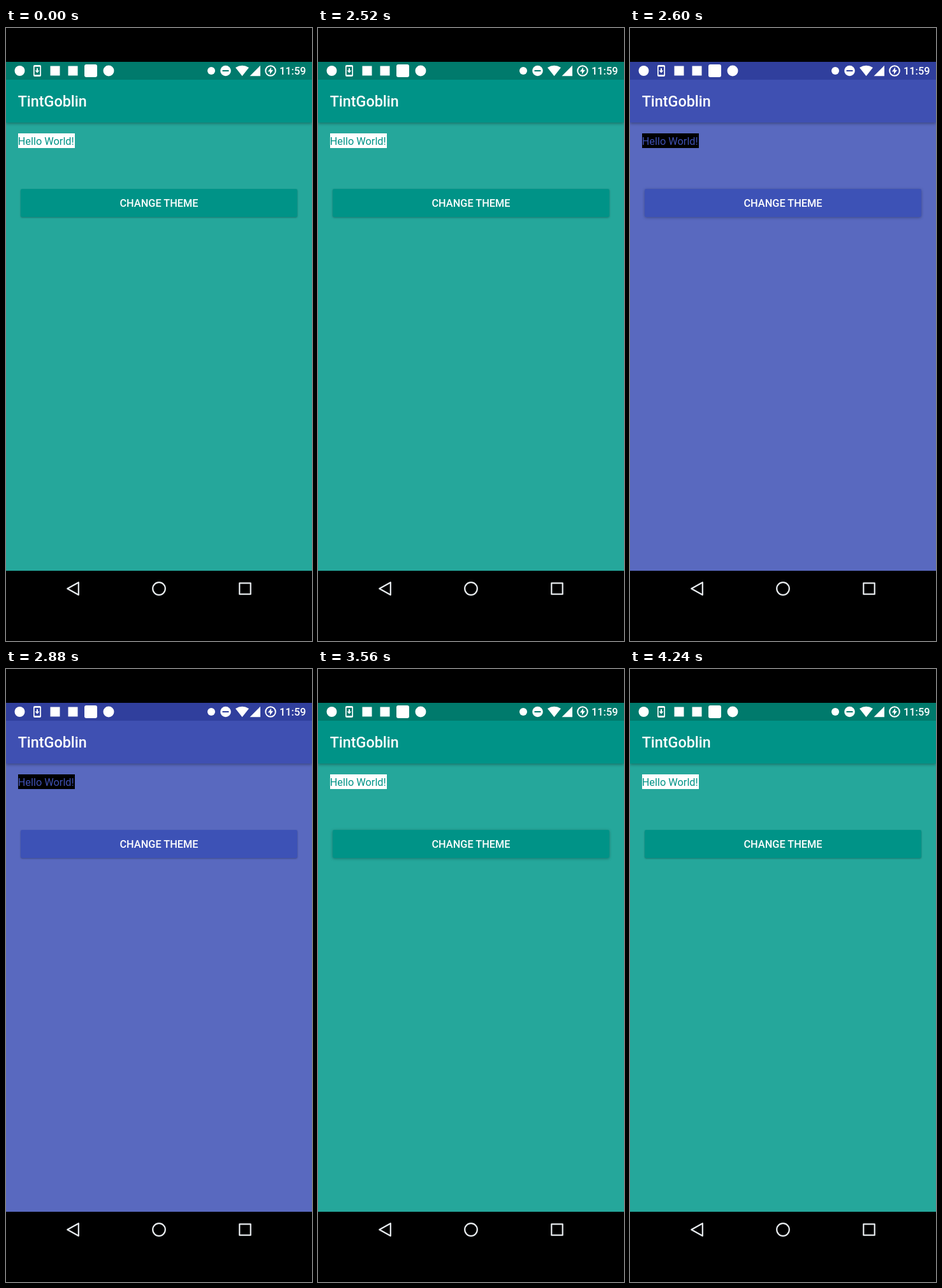
These frames come from a looping animation (480 px wide and 960 px high, 4.44 s). An HTML page:

```html
<!DOCTYPE html>
<html lang="en">
<head>
<meta charset="utf-8">
<title>Theme switch</title>
<style>
  html, body { margin: 0; width: 100%; height: 100%; overflow: hidden; background: #000; }
  svg { display: block; width: 480px; height: 960px; font: 500 16.33px Roboto, sans-serif; fill: #fff; }
  .teal { --page: #25a79b; --bar: #009387; --button: #009387; --status: #007a6c; --label: #fff; }
  .blue { --page: #5969bf; --bar: #3f50b2; --button: #3d52b6; --status: #303f9d; --label: #000; }
  .page { fill: var(--page); }
  .bar { fill: var(--bar); filter: drop-shadow(0 2px 2px rgba(0, 0, 0, .3)); }
  .button { fill: var(--button); }
  .status { fill: var(--status); }
  .label { fill: var(--label); }
  .hello { fill: var(--bar); font-weight: 400; }
  .title { font-size: 23.33px; }
  .line { fill: none; stroke: #fff; stroke-width: 2; }
  .nav { stroke: #e9edf0; stroke-width: 2.2; stroke-linejoin: round; }
</style>
</head>
<body>
<svg id="stage" class="teal" viewBox="0 0 480 960">
  <rect class="page" y="53" width="480" height="797"/>
  <rect class="bar" y="80" width="480" height="68"/>
  <rect class="status" y="53" width="480" height="28"/>

  <!-- notifications -->
  <circle cx="21.5" cy="67" r="8"/>
  <rect x="43" y="58" width="12" height="18" rx="2"/>
  <rect class="status" x="44.7" y="60.7" width="8.6" height="12.6"/>
  <path d="M48 63h2v3.5h2.5L49 70.5l-3.5-4H48z"/>
  <rect x="69.5" y="59.5" width="15" height="15"/>
  <rect x="97.5" y="59.5" width="15" height="15"/>
  <rect x="123" y="57" width="20" height="20" rx="3"/>
  <circle cx="161" cy="67" r="8.5"/>

  <!-- system state -->
  <circle cx="322" cy="67" r="6"/>
  <circle cx="344.5" cy="67" r="8.3"/>
  <rect class="status" x="339.5" y="66" width="10" height="2"/>
  <path d="M360 62Q370.5 55.5 381 62L370.5 75.3z"/>
  <path d="M399 58.7V75.3H382.5z"/>
  <circle class="line" cx="415" cy="67" r="7.8"/>
  <path d="M416 61.5v4.3h3.2l-5.2 6.7v-4.3h-3.2z"/>
  <text x="470.5" y="73.2" text-anchor="end">11:59</text>

  <text class="title" x="18.7" y="123">TintGoblin</text>
  <rect class="label" x="19" y="165" width="89" height="23"/>
  <text class="hello" x="18.7" y="182.7">Hello World!</text>

  <rect id="button" class="button" x="23" y="252" width="434" height="44" rx="2.4"/>
  <text x="240" y="280" text-anchor="middle">CHANGE THEME</text>

  <!-- navigation -->
  <path class="line nav" d="M96.3 878L113.8 868.2V887.8z"/>
  <circle class="line nav" cx="240" cy="878" r="9.8"/>
  <rect class="line nav" x="366.3" y="869.3" width="17.4" height="17.4"/>
</svg>
<script>
  const LOOP = 4440;
  const stage = document.getElementById('stage');
  const button = document.getElementById('button');
  const clamp = v => Math.max(0, Math.min(1, v));

  // Button lift: rises during a tap, then settles.
  const lift = (t, start, peak, end) =>
    clamp(Math.min((t - start) / (peak - start), (end - t) / (end - peak)));

  function draw(now) {
    const t = now % LOOP;
    stage.setAttribute('class', t >= 2600 && t < 3560 ? 'blue' : 'teal');
    const k = Math.max(lift(t, 2480, 2570, 2760), lift(t, 3520, 3570, 3760));
    button.style.filter =
      `drop-shadow(0 ${1 + k}px ${1.2 + 1.3 * k}px rgba(0, 0, 0, .3))`;
    requestAnimationFrame(draw);
  }
  draw(performance.now());
</script>
</body>
</html>
```
